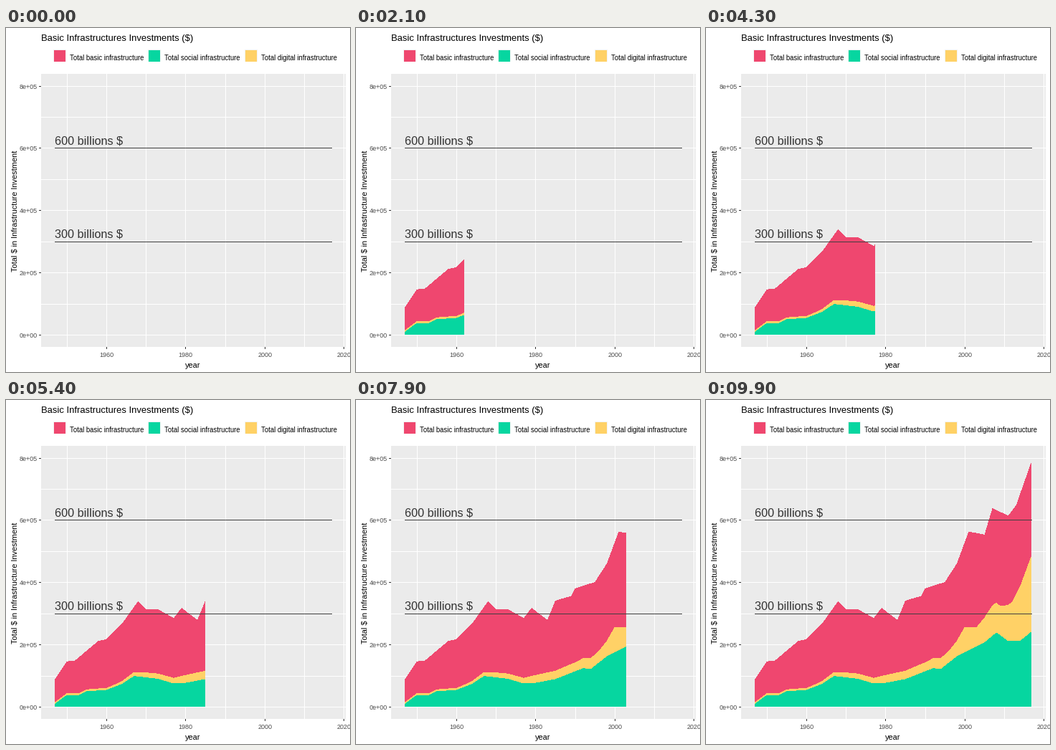
Recreate the animation shown at these times as a matplotlib script. Size 480 px wide and 480 px high, loop 10000 ms.

```python
import numpy as np
import matplotlib.pyplot as plt
from matplotlib.animation import FuncAnimation
from matplotlib.patches import Polygon, Rectangle

FRAMES = 100
START, END = 1947, 2017
LEFT, BASE = 68, 428
RED, GREEN, YELLOW = "#EF476F", "#06D6A0", "#FFD166"
INK, LINE, GREY = "#333333", "#404040", "#4D4D4D"

plt.rcParams["font.family"] = "Liberation Sans"

# Turning points, in billions of dollars; straight lines in between
TOTAL = {1947: 88, 1950: 146, 1952: 148, 1958: 212, 1960: 217, 1964: 268,
         1968: 339, 1970: 314, 1973: 314, 1977: 285, 1979: 318, 1983: 279,
         1985: 341, 1989: 356, 1990: 380, 1995: 401, 1998: 460, 2001: 563,
         2005: 553, 2007: 638, 2011: 614, 2013: 648, 2017: 793}
SOCIAL = {1947: 10, 1950: 38, 1953: 38, 1955: 50, 1960: 54, 1964: 74,
          1967: 99, 1973: 90, 1977: 75, 1980: 77, 1985: 89, 1992: 124,
          1994: 122, 1998: 162, 2005: 207, 2008: 239, 2011: 211, 2014: 212,
          2017: 243}
DIGITAL = {1947: 5, 1962: 7, 1970: 16, 1977: 18, 1980: 25, 1990: 29,
           1996: 38, 1998: 50, 2000: 82, 2003: 62, 2007: 98, 2009: 94,
           2012: 127, 2017: 248}


def px(year):
    return 68.2 + (year - START) * 5.524


def py(value):
    return 428.1 - value * 0.4344


def series(points, at):
    return np.interp(at, list(points), list(points.values()))


fig = plt.figure(figsize=(480 / 72, 480 / 72), dpi=72, facecolor="white")
ax = fig.add_axes([0, 0, 1, 1])
ax.set_xlim(0, 480)
ax.set_ylim(480, 0)
ax.axis("off")


def rect(x, y, w, h, color, z=1):
    ax.add_patch(Rectangle((x, y), w, h, fc=color, lw=0, zorder=z,
                           antialiased=False))


def text(x, y, s, size, color="black", **kw):
    ax.text(x, y, s, fontsize=size, color=color, zorder=6, **kw)


# Panel, grid and axes
rect(49, 64, 425, 381, "#EBEBEB")
for year in range(1950, 2021, 10):
    x = round(px(year))
    rect(x, 64, 1, 381, "white", 2)
    if year % 20 == 0:
        rect(x, 445, 1, 3, INK)
        text(x + 0.5, 459, str(year), 9, GREY, ha="center", clip_on=True)
for step in range(9):
    y = round(py(step * 100))
    rect(49, y, 425, 1, "white", 2)
    if step % 2 == 0:
        rect(46, y, 3, 1, INK)
        text(44, y + 4, f"{step}e+0{5 if step else 0}", 9, GREY, ha="right")

# Titles and legend
text(49, 18, "Basic Infrastructures Investments ($)", 13)
text(261, 474, "year", 11, ha="center")
text(18, 255, "Total $ in Infrastructure Investment", 11, rotation=90,
     ha="right", va="center")
for x, name, color in ((67, "basic", RED), (199, "social", GREEN),
                       (334, "digital", YELLOW)):
    rect(x - 1, 30, 18, 17, "#F2F2F2")
    rect(x, 31, 16, 16, color, 2)
    text(x + 21.7, 45, f"Total {name} infrastructure", 9.5)

# Reference levels
for level in (300, 600):
    y = round(py(level))
    rect(LEFT, y, 387, 1, LINE, 5)
    text(67.6, y - 5, f"{level} billions $", 16.2, INK)

# Stacked areas, tallest at the back, built from whole pixel columns
columns = np.arange(LEFT, int(px(END)) + 1)
at = START + (columns + 0.5 - px(START)) / (px(START + 1) - px(START))
social = series(SOCIAL, at)
stack = [(series(TOTAL, at), RED),
         (social + series(DIGITAL, at), YELLOW),
         (social, GREEN)]
tops = [np.round(py(values)) for values, _ in stack]
areas = [ax.add_patch(Polygon([(LEFT, BASE)] * 3, fc=color, lw=0, zorder=3,
                              antialiased=False))
         for _, color in stack]

# Each year is reached on a whole frame; between them the edge moves linearly
years = np.arange(START, END + 1)
arrival = np.round((years - START) * (FRAMES - 1) / (END - START))


def update(i):
    n = int(px(np.interp(i, arrival, years))) - LEFT
    xs = np.repeat(np.arange(LEFT, LEFT + n + 1), 2)
    for area, top in zip(areas, tops):
        ys = np.concatenate(([BASE], np.repeat(top[:n], 2), [BASE]))
        area.set_xy(np.column_stack((xs, ys)))
    return areas


anim = FuncAnimation(fig, update, frames=FRAMES, interval=100, repeat=True,
                     repeat_delay=0)
plt.show()
```
